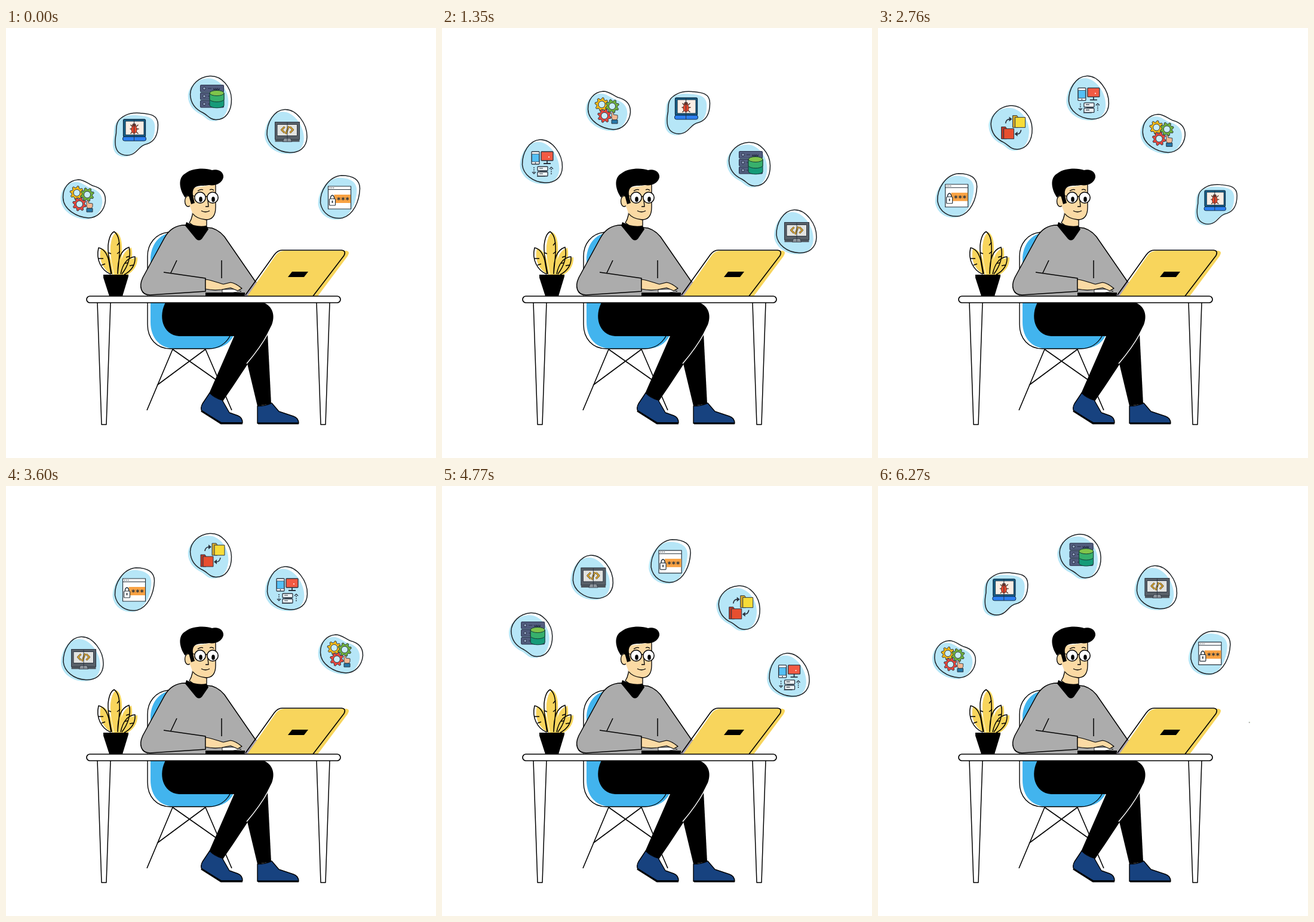
An HTML page with a canvas that plays this animation: 720 px wide and 720 px high, repeating every 6.3 s.

```html
<!DOCTYPE html>
<html lang="en">
<head>
<meta charset="utf-8">
<title>Developer at desk</title>
<style>
html, body { margin: 0; width: 100%; height: 100%; overflow: hidden; background: #fff; }
canvas { display: block; width: 720px; height: 720px; }
</style>
</head>
<body>
<canvas id="stage" width="720" height="720"></canvas>
<script>
const canvas = document.getElementById('stage');
const LOOP = 6300, STEP = 900;
let g = canvas.getContext('2d');
const INK = '#000', LINE = '#2b3440', SKY = '#b6e6f7', YELLOW = '#f8d55c', SKIN = '#fbdaa4';

function shape(d, fill, stroke, width = 1.6) {
  const p = new Path2D(d);
  if (fill) { g.fillStyle = fill; g.fill(p); }
  if (stroke) { g.strokeStyle = stroke; g.lineWidth = width; g.stroke(p); }
}
function box(x, y, w, h, fill, stroke, width = 1, r = 0) {
  g.beginPath();
  g.roundRect(x, y, w, h, r);
  if (fill) { g.fillStyle = fill; g.fill(); }
  if (stroke) { g.strokeStyle = stroke; g.lineWidth = width; g.stroke(); }
}
function oval(x, y, rx, ry, fill, stroke, width = 1) {
  g.beginPath();
  g.ellipse(x, y, rx, ry, 0, 0, 7);
  if (fill) { g.fillStyle = fill; g.fill(); }
  if (stroke) { g.strokeStyle = stroke; g.lineWidth = width; g.stroke(); }
}
function at(x, y, draw, s = 1) {
  g.save();
  g.translate(x, y);
  g.scale(s, s);
  draw();
  g.restore();
}
function label(text, x, y, size, fill) {
  g.font = `bold ${size}px "DejaVu Sans Mono", monospace`;
  g.fillStyle = fill;
  g.fillText(text, x, y);
}

/* ---------- desk scene ---------- */
function chair() {
  shape('M272 344C255 347 242 365 242 388V492C242 520 258 537 285 537H345C362 536 375 528 381 515L300 440Z', '#42b4ee');
  shape('M272 342C250 344 237 362 237 382V496C237 520 252 537 275 537H340C356 537 368 528 375 516', null, INK, 1.4);
  shape('M279 538L236 640M334 538L378 640M279 538L353 590M334 538L253 598', null, INK);
}
function legs() {
  shape('M404 562L438 511L444 629L421 633Z', INK);
  shape('M268 458H425C445 462 452 479 445 497C441 505 439 509 437 513C420 539 390 586 363 625L340 612L382 516H290C262 514 254 482 268 458Z', INK);
  shape('M439 511Q426 535 403 562', null, '#fff', 1.5);
  shape('M341 611L329 629Q325 636 328 642L361 661H396Q396 652 388 649L374 644L362 623Q350 620 341 611Z', '#17427f', INK, 1.4);
  shape('M327 641L360 662H396', null, INK, 3);
  shape('M421 633V662H490Q490 653 481 650L457 642L445 628Q434 633 421 633Z', '#17427f', INK, 1.4);
  shape('M422 662H490', null, INK, 3);
}
function head() {
  shape('M313 296Q314 316 307 326L322 337L336 331L336 319Z', SKIN, INK, 1.3);
  oval(305, 290, 5.5, 9, SKIN, INK, 1.3);
  shape('M309 268L351 262V300C351 315 345 321 335 321C325 320 318 317 313 312L307 296Z', SKIN);
  shape('M351 262V300C351 315 345 321 335 321C325 320 317 317 313 311', null, INK, 1.3);
  shape('M300 284C291 272 286 251 301 243C312 234 335 234 345 238C355 235 365 241 364 250C362 260 350 265 340 263C330 265 318 262 314 270C311 276 314 284 316 293L310 295L307 284C306 279 302 280 300 284Z', INK);
  shape('M307 279L317 282M334 283Q336 281 337 283M321 273Q326 269 330 271M341 271Q345 269 348 272M338 289L339 299L334 299M327 306Q334 310 341 306', null, INK, 1.3);
  for (const x of [325, 346]) {
    oval(x, 284, 9.2, 9.3, '#fff', INK, 1.5);
    oval(x + 1, 287, 2.8, 4.4, INK);
  }
  shape('M302 325L300 331L318 353Q323 358 328 353L339 337L336 331Q318 334 302 325Z', INK);
}
function body() {
  shape('M300 330L345 335C358 339 365 347 371 357L420 428L405 449H241C226 447 222 433 229 418L265 352C272 339 284 330 300 330Z', '#acacac');
  shape('M420 428L371 357C365 347 358 339 345 335L300 330C284 330 272 339 265 352L229 418C222 433 226 447 241 447L334 441V419L264 409M286 389L276 410M361 389V419', null, INK, 1.5);
  shape('M334 443H400V450H334Z', INK);
  shape('M362 438L385 437L394 441L380 443H362Z', '#fff', INK, .8);
  shape('M334 421C345 422 355 427 364 429L376 426Q384 427 395 436L388 440L376 435L361 438Q348 440 334 437Z', SKIN, INK, 1.2);
}
function laptop() {
  shape('M399 448L416 426L424 424L407 449Z', '#a9a2b2');
  shape('M404 449L452 380Q458 373 466 373H570Q577 374 572 382L522 449Z', YELLOW);
  shape('M401 447L449 380Q455 372 462 372H562Q570 373 566 381L514 449', null, INK, 1.6);
  shape('M479 408H506L499 417H472Z', INK);
}
function plant() {
  const leaves = 'M175 412C160 406 150 388 155 368Q167 370 172 389L176 412M177 412C174 395 170 380 171 364Q173 345 181 341Q189 346 190 364C191 380 188 396 187 412M187 412C187 386 192 372 206 367C210 382 204 399 194 412M192 412C195 396 203 384 216 383C217 397 209 407 198 413';
  at(4, 1, () => shape(leaves, YELLOW));
  shape(leaves, null, INK, 1.5);
  shape('M171 376L176 378M190 359L186 364M191 374L186 378M155 386L163 386M160 397L166 395M207 382L201 384M205 393L199 394M213 397L207 398', null, INK, 1.4);
  shape('M163 413H205V416L195 449H173L163 418Z', INK);
}
function table() {
  for (const x of [153, 520]) shape(`M${x} 460l7 204h8l7 -204`, '#fff', INK, 1.5);
  box(135, 449, 425, 11, '#fff', INK, 1.7, 5.5);
}

/* ---------- bubble icons ---------- */
function cog(x, y, r, color, turn) {
  g.beginPath();
  for (let i = 0; i < 32; i++) {
    const a = (i + .5) / 32 * Math.PI * 2 + turn;
    const q = i % 4 < 2 ? r : r * .75;
    g.lineTo(x + Math.cos(a) * q, y + Math.sin(a) * q);
  }
  g.closePath();
  g.fillStyle = color;
  g.fill();
  g.strokeStyle = LINE;
  g.lineWidth = 1;
  g.stroke();
  oval(x, y, r * .48, r * .48, '#c9edf8', LINE);
}
function gears() {
  cog(-12.5, -10, 11.5, '#f5b916', 0);
  cog(5, -7, 11.5, '#6fb23c', .3);
  cog(-8, 9, 11.5, '#e8473d', .1);
  shape('M4 13V8Q3 2 7 3V7L14 8Q15 14 12 16H6Z', '#f3b893', LINE, .9);
  box(4, 16, 10, 6, '#2678a8', LINE);
}
function bug() {
  box(-22, -25, 37, 29, '#19648b', '#0b2a45', 1.3, 2);
  box(-18.5, -22, 31, 23, '#fbeee4', '#0b2a45');
  box(-23, 4, 39, 7, '#2d7ff0', '#0b2a45', 1, 3);
  shape('M-10 -16L-4 -10L3 -16M-11 -9H4M-10 -1L-4 -7L3 -1', null, '#4d2c22', 1.3);
  oval(-4, -15, 3, 3, '#8a3a25', LINE, .7);
  oval(-4, -8, 4.6, 6.5, '#e4482c', '#5c1c14', .8);
  shape('M-4 -25V11', null, LINE, 1);
}
function database() {
  for (let i = 0; i < 3; i++) {
    const y = -21.5 + i * 13;
    box(-17.5, y, 39, 11.5, '#525d7f', '#29304a', 1.1, 1.5);
    oval(-11, y + 5.7, 2.4, 2.4, '#8fa0bd', '#222a40');
    shape(`M-5 ${y + 5.7}h6`, null, '#29304a', 1);
  }
  label('www', 4, -13, 6, '#1b2136');
  shape('M-2 -8V13C2 18 18 18 22 13V-8Z', '#169b79', '#123c35', 1);
  shape('M-2 -8V3C2 8 18 8 22 3V-8Z', '#37b06c', '#123c35', 1);
  oval(10, -8, 12, 4.5, '#80c44b', '#123c35');
}
function code() {
  box(-20, -15, 41, 29, '#596169', LINE, 1.1);
  box(-16.5, -11, 33.5, 19, '#e2e3e1', LINE);
  box(-20, 14, 41, 4, '#4d555c');
  shape('M-5 12H6L8 18H-7Z', '#8d949b', LINE, .8);
  const mark = 'M-4 -7L-9 -2L-4 3M5 -7L10 -2L5 3M3 -8L-2 5';
  shape(mark, null, '#4b3a17', 3);
  shape(mark, null, '#f2b632', 1.5);
  shape('M.5 -14V17', null, LINE, .9);
}
function lock() {
  box(-20, -18, 38, 38, '#fff', '#26323c', 1.2);
  shape('M-20 -12.5H18', null, '#26323c', 1);
  for (let i = 0; i < 3; i++) oval(-17 + i * 3, -15.3, .8, .8, '#26323c');
  box(-10, -4, 27.5, 14, '#f9a243');
  label('***', -6, 9, 12, '#26323c');
  shape('M-16 4V0Q-13 -6 -10 0V4', null, '#26323c', 1.5);
  box(-18, 3, 10, 11, '#fff', '#26323c', 1.2, 1);
  shape('M-13 6V10', null, '#26323c', 1.8);
}
function folder(x, y, color, dark) {
  shape(`M${x} ${y}h7l2 3v17h-9z`, dark, LINE, 1);
  box(x + 4, y + 3, 17, 17, color, LINE, 1);
}
function folders() {
  folder(2, -20, '#f7dc38', '#d8a929');
  folder(-17, -1, '#e84f2f', '#bd3826');
  shape('M-10 -7Q-9 -14 -3 -14M16 4Q15 11 9 11', null, LINE, 1.7);
  shape('M-4 -18L1 -14L-4 -10ZM10 7L5 11L10 15Z', LINE);
}
function devices() {
  box(-18, -16, 13, 21, '#fff', LINE, 1.3, 1);
  box(-17.5, -12, 12, 13, '#55c0f5', LINE, .8);
  box(-2, -16, 20, 15, '#f25a43', LINE, 1.3, 1);
  shape('M8 -1V4M2 4H14', null, LINE, 1.8);
  oval(-11.5, 3, .9, .9, LINE);
  oval(11, -7, 1, 1, '#fff');
  for (const y of [9, 18]) box(-8, y, 17, 7, '#eef4f7', LINE, 1.3, 1);
  shape('M-4 16.8H8M-9 25.5H5M-5 12H1M-5 21H1', null, LINE, 1.2);
  g.setLineDash([2, 1.5]);
  shape('M-14 10V20M15 13V22', null, LINE, 1.4);
  g.setLineDash([]);
  shape('M-17 18L-14 21L-11 18M12 13L15 10L18 13', null, LINE, 1.4);
}

const PEBBLE = 'M-4 -36C16 -37 34 -12 33.5 10C33 28 20 37 4 36C-16 35 -32 22 -33.5 6C-34 -14 -22 -35 -4 -36Z';
const DROP = 'M-2 -36.5C18 -38 34 -18 34.5 2C35 22 25 37 8 36.5C-2 36 -4 30 -13 25C-26 19 -34 8 -34.5 -6C-34 -22 -20 -35 -2 -36.5Z';
const CLOUD = 'M-10 -32C0 -32 5 -26 14 -22C26 -19 36 -12 35.5 3C34 20 22 32 7 32C-12 31 -35 18 -35.5 -2C-36 -18 -26 -31 -10 -32Z';
const BEAN = 'M36 -16C36 2 30 12 18 16C8 18 5 24 -2 30C-10 37 -22 37 -30 30C-38 22 -36 8 -34 -2C-34 -14 -33 -22 -26 -27C-15 -36 -5 -36 6 -35.5C20 -34 36 -34 36 -16Z';
const EGG = 'M2 -36C20 -36 33 -30 33 -14C32 8 22 30 4 35C-14 38 -30 28 -33 10C-34 -10 -20 -34 2 -36Z';

// grow: phases where the bubble starts and ends growing; leave: phase where it begins to shrink
const bubbles = [
  { icon: gears, blob: CLOUD, dx: 2, dy: -1, grow: [-1, 0], leave: 4.5 },
  { icon: bug, blob: BEAN, dx: 2.5, dy: 6, grow: [-.5, -.15], leave: 4 },
  { icon: database, blob: DROP, dx: 0, dy: 1, grow: [-.5, -.15], leave: 4.5 },
  { icon: code, blob: PEBBLE, dx: .5, dy: 1.5, grow: [-.9, 0], leave: 4.5 },
  { icon: lock, blob: EGG, dx: -.5, dy: 1, grow: [-.5, -.33], leave: 4 },
  { icon: folders, blob: DROP, dx: 0, dy: 0, grow: [-.5, -.33], leave: 4 },
  { icon: devices, blob: PEBBLE, dx: 1, dy: 0, grow: [-.9, 0], leave: 4.5 }
];

// arc points, half a phase apart, from phase -1 to 5
const arc = [[86, 398], [107, 343], [129, 287], [167, 223], [216, 172], [278, 139], [343, 116],
  [410, 136], [470, 171], [515, 227], [560, 282], [593, 339], [623, 398]];

function spline(a, b, c, d, u) {
  return b + u / 2 * (c - a + u * (2 * a - 5 * b + 4 * c - d + u * (3 * (b - c) + d - a)));
}
function place(phase) {
  const n = arc.length - 1, f = (phase + 1) * 2;
  const i = Math.min(n - 1, Math.floor(f));
  const p = k => arc[Math.max(0, Math.min(n, k))];
  return [0, 1].map(c => spline(p(i - 1)[c], p(i)[c], p(i + 1)[c], p(i + 2)[c], f - i));
}
function drawBubble(b, i, t) {
  const phase = (i + t / STEP + 1) % 7 - 1;
  if (phase >= 5) return;
  const [from, to] = b.grow;
  const s = Math.min(1, (phase - from) / (to - from), (5 - phase) / (5 - b.leave));
  if (s <= 0) return;
  const [x, y] = place(phase);
  at(x + b.dx, y + b.dy, () => {
    at(-4.5, 3, () => shape(b.blob, SKY), .98);
    shape(b.blob, null, '#1d2226', 1.5);
    b.icon();
  }, s);
}

const desk = document.createElement('canvas');
desk.width = desk.height = 720;
const screen = g;
g = desk.getContext('2d');
g.lineJoin = 'round';
g.fillStyle = '#fff';
g.fillRect(0, 0, 720, 720);
[chair, legs, body, head, plant, laptop, table].forEach(draw => draw());
g = screen;
g.lineJoin = 'round';

const start = performance.now();
function frame(now) {
  const t = Math.floor(Math.max(0, now - start) % LOOP / 30) * 30;
  g.drawImage(desk, 0, 0);
  bubbles.forEach((b, i) => drawBubble(b, i, t));
  requestAnimationFrame(frame);
}
frame(start);
</script>
</body>
</html>
```
